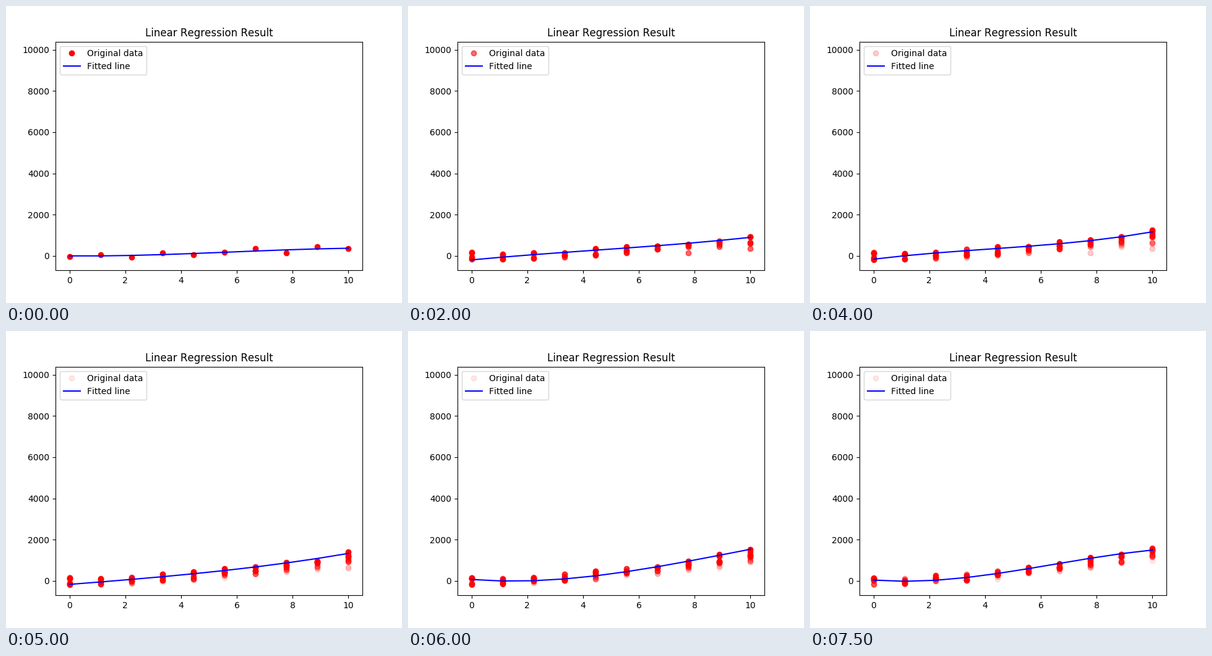
A matplotlib script that plays this animation: 640 by 480 pixels, repeating every 8 s.

```python
import numpy as np
import matplotlib.pyplot as plt
from matplotlib.animation import FuncAnimation

STEPS = 16
WINDOW = 10
x = np.linspace(0, 10, 10)

plt.rcParams["text.kerning_factor"] = 6  # whole-pixel glyph spacing


def batch(n):
    """Noisy samples of a curve that grows quickly, then more slowly."""
    rng = np.random.default_rng(n)
    height = 430 + 200 * n**0.65
    spread = 190 - 8 * x
    noise = rng.permutation(np.linspace(-1, 1, x.size))
    return height * (x / 10) ** 1.8 + spread * noise


def fit(y):
    return np.polyval(np.polyfit(x, y, 3), x)


batches = [batch(n) for n in range(STEPS)]

fig, ax = plt.subplots(figsize=(6.4, 4.8), dpi=100)


def draw(n):
    ax.clear()
    first = max(0, n - WINDOW + 1)
    for k in range(first, n + 1):
        # Older batches fade out.
        ax.plot(x, batches[k], "ro", alpha=1 - (n - k) / WINDOW,
                label="Original data" if k == first else None)
    ax.plot(x, fit(batches[n]), "b-", label="Fitted line")
    ax.set_xlim(-0.5, 10.5)
    ax.set_ylim(-700, 10390)
    ax.set_title("Linear Regression Result")
    ax.legend(loc="upper left")
    return []


anim = FuncAnimation(fig, draw, frames=STEPS, init_func=lambda: draw(0),
                     interval=500, repeat=True, repeat_delay=0)
plt.show()
```
